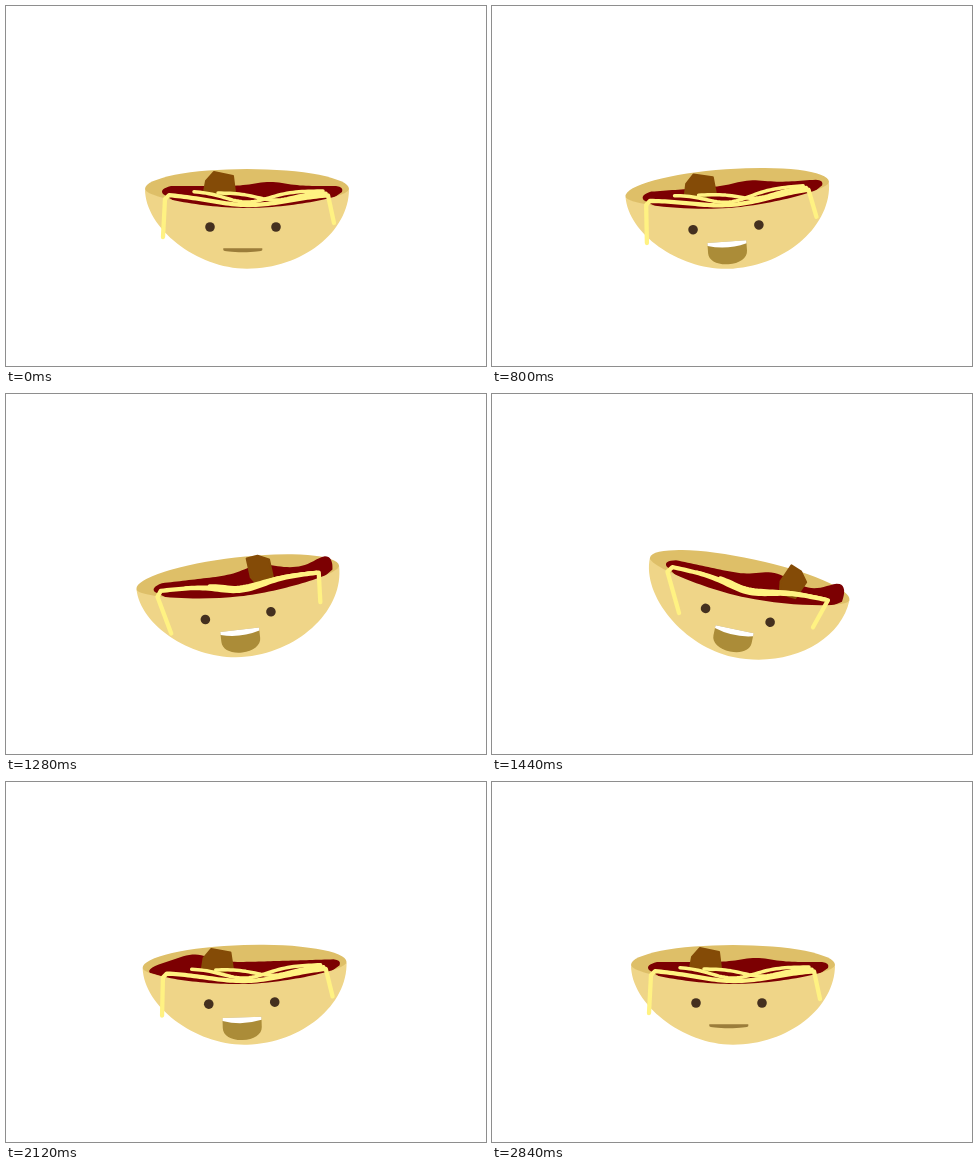
An HTML page with a canvas that plays this animation: 480 by 360 pixels, repeating every 2880 ms.

```html
<!DOCTYPE html>
<html lang="en">
<head>
<meta charset="utf-8">
<title>Rocking noodle bowl</title>
<style>
  html, body { margin: 0; width: 100%; height: 100%; overflow: hidden; background: #fff; }
  canvas { display: block; width: 480px; height: 360px; }
</style>
</head>
<body>
<canvas id="stage" width="480" height="360"></canvas>
<script>
const ctx = document.getElementById('stage').getContext('2d');
const LOOP = 2880, STEP = 40;
const PIVOT = { x: 240, y: 263 };
const RIM = { x: 241, y: 183, rx: 102, ry: 20 };
const COLOR = {
  front: '#efd588', back: '#debf68', sauce: '#7c0002', meat: '#844b07',
  noodle: '#fff282', eye: '#44301f', mouth: '#ab8c38', smile: '#9b7d3a'
};
const MEAT = [[-16, 8], [-14, -3], [-6, -12], [13, -8], [15, 8], [3, 12]];

const mix = (a, b, k) => a + (b - a) * k;
const bell = (x, centre, width) => Math.exp(-(((x - centre) / width) ** 2));
function ramp(x, from, to) {
  const k = Math.max(0, Math.min(1, (x - from) / (to - from)));
  return k * k * (3 - 2 * k);
}

function poseAt(t) {
  const surge = bell(t, 1440, 280);
  const rocking = ramp(t, 200, 800) * (1 - ramp(t, 2300, 2840));
  return {
    surge,
    tilt: (4.2 * rocking + 8 * surge) * Math.cos(Math.PI * (t - 1430) / 205),
    backwash: ramp(t, 1440, 1720) * (1 - ramp(t, 2150, 2600)),
    open: ramp(t, 200, 520) * (1 - ramp(t, 2360, 2720))
  };
}

function fill(color, trace) {
  ctx.beginPath();
  trace();
  ctx.closePath();
  ctx.fillStyle = color;
  ctx.fill();
}

// lower half of an oval from one rim end to the other; fullness 0.55 is an ellipse
function halfOval(depth, fullLeft, fullRight, side) {
  const { x, y, rx } = RIM, bottom = y + depth;
  const left = { end: x - rx, full: fullLeft }, right = { end: x + rx, full: fullRight };
  const [from, to] = side > 0 ? [left, right] : [right, left];
  ctx.lineTo(from.end, y);
  ctx.bezierCurveTo(from.end, y + depth * from.full, x - side * rx * from.full, bottom, x, bottom);
  ctx.bezierCurveTo(x + side * rx * to.full, bottom, to.end, y + depth * to.full, to.end, y);
}

function drawSauce({ surge, backwash }) {
  const tip = 155 - 11 * backwash;
  const surface = x => 180
    - 4 * (1 - backwash + surge) * bell(x, 264, 22)
    - 9 * backwash * bell(x, 190, 24)
    - 11 * surge * bell(x, 331, 17);
  fill(COLOR.sauce, () => {
    ctx.moveTo(168, 195);
    ctx.lineTo(tip + 2, 188);
    ctx.quadraticCurveTo(tip - 2, 183, 165, surface(165));
    for (let x = 168; x <= 330; x += 3) ctx.lineTo(x, surface(x));
    ctx.quadraticCurveTo(338, surface(331) + 1, 336, 186);
    ctx.lineTo(326, 193);
    ctx.lineTo(240, 210);
  });
}

function drawMeatball({ surge }) {
  const roll = 70 * surge;
  ctx.save();
  ctx.translate(214 + roll, 178);
  ctx.rotate(roll / 40);
  fill(COLOR.meat, () => MEAT.forEach(p => ctx.lineTo(...p)));
  ctx.strokeStyle = COLOR.meat;
  ctx.lineWidth = 2;
  ctx.stroke();
  ctx.restore();
}

function sag(from, to, top, depth, centre, width) {
  for (let x = from; x <= to; x += 3) ctx.lineTo(x, top + depth * bell(x, centre, width));
}

function drawNoodles({ surge }) {
  const tight = ramp(surge, 0, 0.3), swing = surge ** 2;
  ctx.strokeStyle = COLOR.noodle;
  ctx.lineWidth = 4.3;
  ctx.beginPath();
  ctx.moveTo(157 + 22 * swing, 231);
  ctx.lineTo(159, 193);
  sag(163, 323, 187.5, mix(11.5, 9, tight), 243, mix(58, 32, tight));
  ctx.lineTo(328 - 15 * swing, 217);
  ctx.stroke();

  ctx.lineWidth = 3.5;
  ctx.beginPath();
  sag(188, 318, mix(185, 187, tight), mix(11, 6, tight), 241, 32);
  ctx.stroke();
  ctx.beginPath();
  sag(212, 320, 187, 7, mix(269, 247, tight), 26);
  ctx.stroke();
}

function drawFace({ open }) {
  for (const x of [204, 270]) fill(COLOR.eye, () => ctx.arc(x, 221, 4.8, 0, 2 * Math.PI));
  const left = 217.3, right = 256.3, middle = (left + right) / 2;
  const top = mix(242.3, 235.3, open), bottom = mix(246.3, 258, open);
  const side = mix(top, bottom, 0.45), corner = mix(side, bottom, 0.6);
  fill(open > 0.15 ? COLOR.mouth : COLOR.smile, () => {
    ctx.moveTo(left, top);
    ctx.lineTo(right, top);
    ctx.lineTo(right, side);
    ctx.bezierCurveTo(right, corner, middle + 11, bottom, middle, bottom);
    ctx.bezierCurveTo(middle - 11, bottom, left, corner, left, side);
  });
  fill('#fff', () => {
    ctx.moveTo(left, top);
    ctx.lineTo(right, top);
    ctx.lineTo(right, top + 3 * open);
    ctx.quadraticCurveTo(middle, top + 8.5 * open, left, top + 3 * open);
  });
}

function draw(t) {
  const pose = poseAt(t);
  ctx.fillStyle = '#fff';
  ctx.fillRect(0, 0, 480, 360);
  ctx.save();
  ctx.translate(PIVOT.x, PIVOT.y);
  ctx.rotate(pose.tilt * Math.PI / 180);
  ctx.translate(-PIVOT.x, -PIVOT.y);
  ctx.lineCap = ctx.lineJoin = 'round';

  fill(COLOR.back, () => ctx.ellipse(RIM.x, RIM.y, RIM.rx, RIM.ry, 0, 0, 2 * Math.PI));
  drawSauce(pose);
  drawMeatball(pose);
  fill(COLOR.front, () => {
    halfOval(79.7, 0.49, 0.54, 1);
    halfOval(19, 0.42, 0.42, -1);
  });
  drawNoodles(pose);
  drawFace(pose);
  ctx.restore();
}

const start = performance.now();
function tick() {
  const t = (performance.now() - start) % LOOP;
  draw(Math.floor(t / STEP) * STEP);
  requestAnimationFrame(tick);
}
tick();
</script>
</body>
</html>
```
